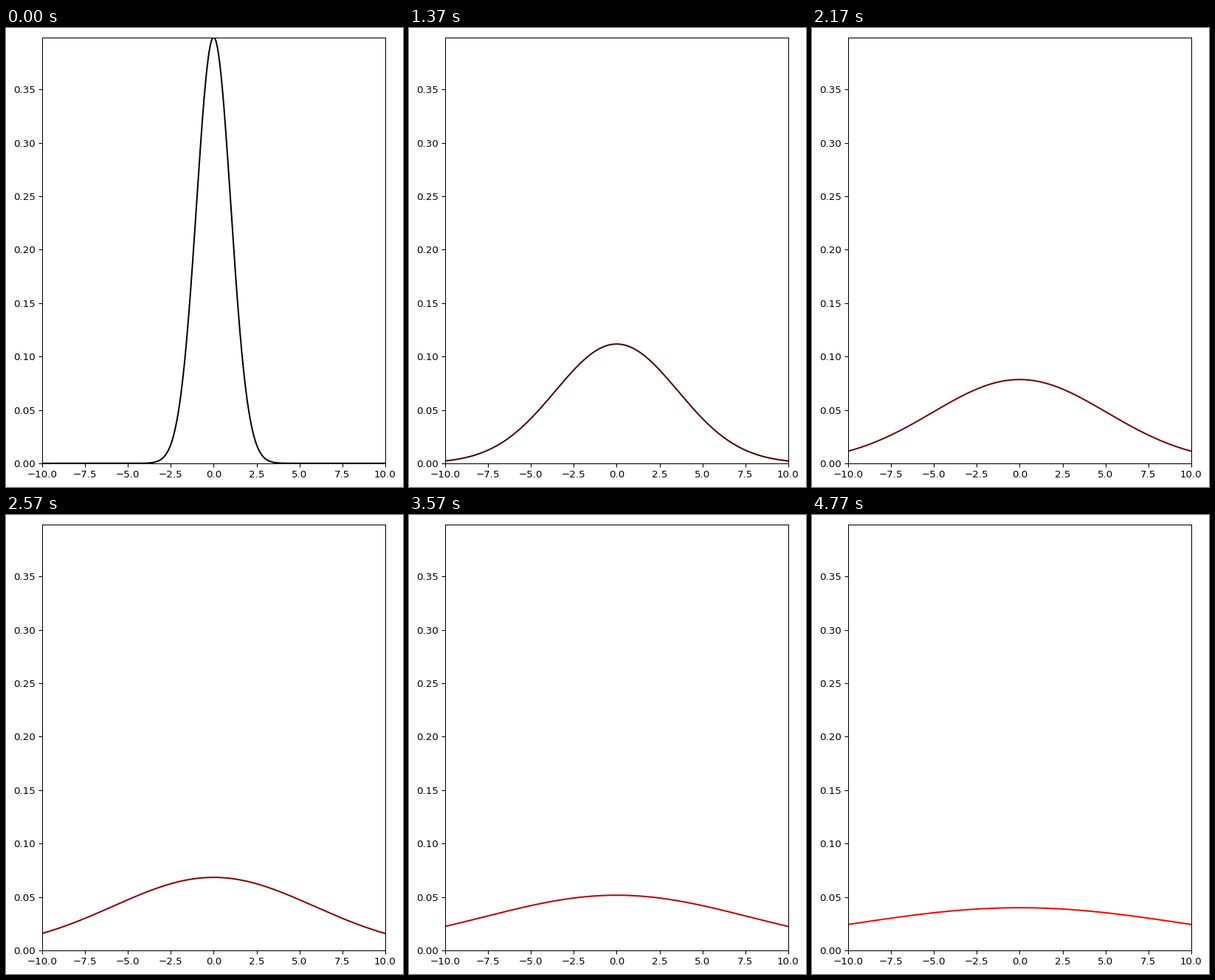
These frames come from a looping animation (538x622 px, 4.81 s). A matplotlib script:

```python
import matplotlib.pyplot as plt
import numpy as np
from matplotlib.animation import FuncAnimation

WIDTH, HEIGHT, DPI = 538, 622, 96
LOOP_MS, TICK_MS = 4810, 10
STEPS = 120

plt.rcParams.update({"font.family": "DejaVu Sans", "font.size": 10})

# 25 steps per second, shown on a 30 Hz clock and rounded to whole ticks.
starts = np.array([round(round(1.2 * n) * 10 / 3) for n in range(STEPS)])
x = np.linspace(-10, 10, 501)


def normal_pdf(x, sigma):
    return np.exp(-0.5 * (x / sigma) ** 2) / (sigma * np.sqrt(2 * np.pi))


fig = plt.figure(figsize=(WIDTH / DPI, HEIGHT / DPI), dpi=DPI, facecolor="white")
ax = fig.add_axes([48.9 / WIDTH, 32.1 / HEIGHT, 465 / WIDTH, 577.3 / HEIGHT])
ax.set_xlim(-10, 10)
ax.set_ylim(0, normal_pdf(0, 1))
ax.set_xticks(np.arange(-10, 10.1, 2.5))
ax.set_yticks(np.arange(8) * 0.05)
curve, = ax.plot(x, normal_pdf(x, 1), color="black", lw=1.5)


def update(tick):
    step = np.searchsorted(starts, tick, side="right") - 1
    progress = step / (STEPS - 1)
    curve.set_ydata(normal_pdf(x, 1 + 9 * progress))
    curve.set_color((progress, 0, 0))
    return curve,


anim = FuncAnimation(fig, update, frames=LOOP_MS // TICK_MS, interval=TICK_MS,
                     repeat=True, repeat_delay=0, blit=True)
plt.show()
```
